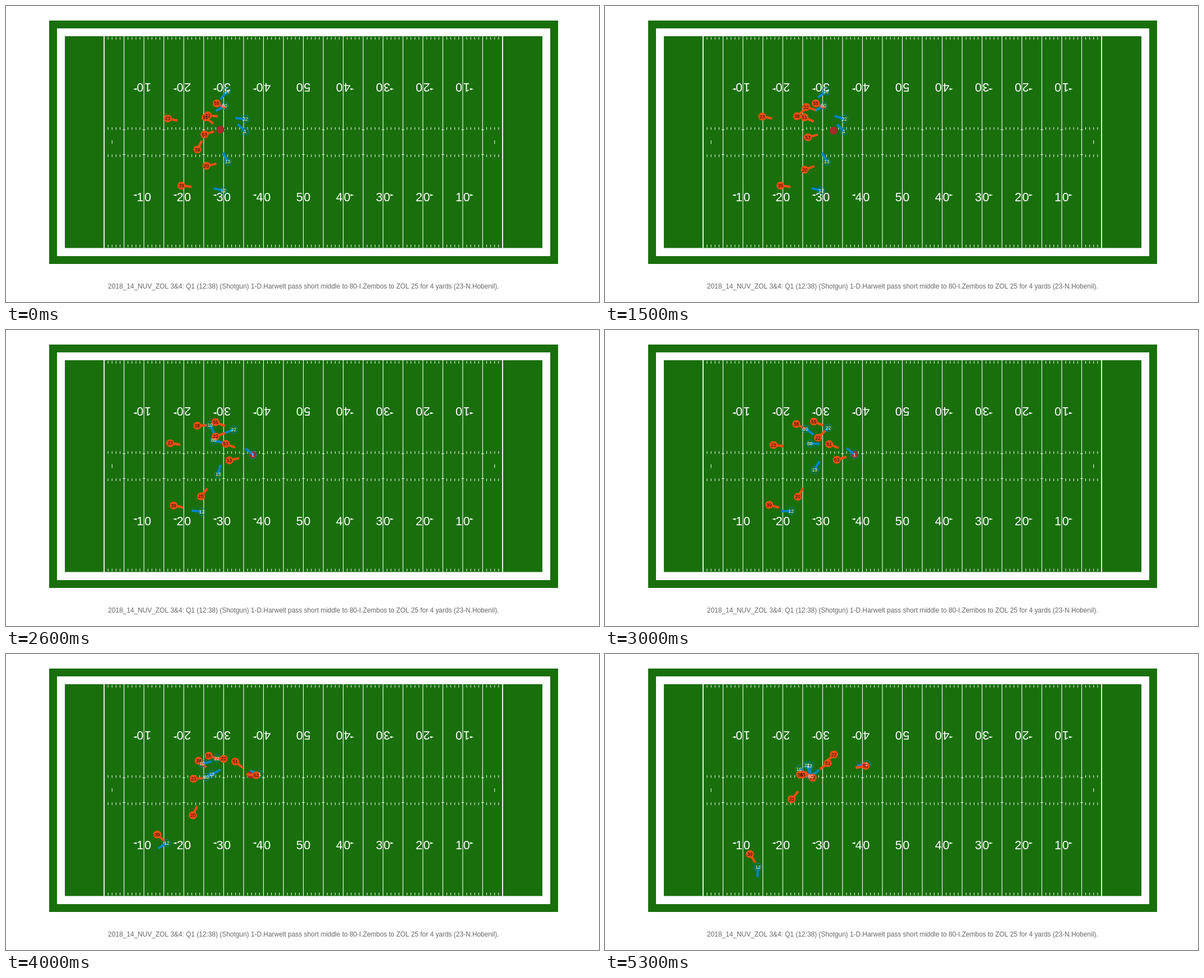
Recreate the animation shown at these times as an HTML page with a canvas. Size 1058x529 px, loop 5400 ms.

```html
<!DOCTYPE html>
<html lang="en">
<head>
<meta charset="utf-8">
<title>Passing play</title>
<style>
html, body { margin: 0; width: 100%; height: 100%; overflow: hidden; background: #fff; }
canvas { display: block; }
</style>
</head>
<body>
<canvas width="1058" height="529"></canvas>
<script>
const ctx = document.querySelector('canvas').getContext('2d');
const LOOP = 5400, STEP = 100;
const GREEN = '#196f0c', ORANGE = '#fb4f14', BLUE = '#0085ca';
const FONT = 'Arial, "Liberation Sans", sans-serif';
const CX = 530.5, CY = 243.3, YARD = 7.11;
const KEYS = [0, 1500, 3000, 4500, 5300];
const SNAP = 1100, HELD = 1800, THROWN = 3900, CAUGHT = 4500;
const SPOT = { x: 382.5, y: 221 };
const CAPTION = '2018_14_NUV_ZOL 3&4: Q1 (12:38) (Shotgun) 1-D.Harwelt pass short middle to ' +
  '80-I.Zembos to ZOL 25 for 4 yards (23-N.Hobenil).';

// A route ends at the last key; a player with a shorter one waits at its first point.
// Players face the opponent they mark, the ball, or (unmarked) where they run.
const player = (number, mark, ...route) => ({ number, mark, route });
const away = [
  player(10, 22, [394, 152.5], [357.5, 176.5], [347.5, 202.5], [346, 206]),
  player(80, 51, [390, 178], [365.5, 203], [356, 223.5], [367, 218.5]),
  player(22, 22, [427, 202], [398.5, 174.5], [367.5, 193.5], [360.5, 199]),
  player(1, 55, [426.5, 224], [445, 222.5], [457, 209], [467, 196.5]),
  player(13, 51, [395.5, 278], [374, 250], [365.5, 204], [365, 200]),
  player(12, null, [388, 330], [386, 329.5], [332, 323.5], [275, 350.5], [273, 380.5])
];
const home = [
  player(23, 'ball', [288.5, 201], [280.5, 197.5], [300.5, 205.5], [352, 228], [370.5, 221]),
  player(38, 10, [341.5, 256.5], [342.5, 197], [341, 168], [345.5, 204], [348, 215.5]),
  player(51, 'ball', [356, 199], [400, 204], [410.5, 188], [397.5, 195]),
  player(55, 22, [376, 174], [372.5, 163.5], [356.5, 195], [353, 215.5]),
  player(22, 22, [360, 195.5], [359, 180.5], [380, 192.5], [393, 184], [408.5, 179.5]),
  player(53, 'ball', [354, 229.5], [362, 234.5], [413.5, 232], [457.5, 208], [465, 200]),
  player(20, 13, [357.5, 285.5], [356.5, 292.5], [344, 298], [331, 280], [333, 259.5]),
  player(39, 12, [313, 321], [293, 312.5], [262, 331.5], [258.5, 357.5])
];

// Smooth curve through the keys that never overshoots them
function curve(times, values, t) {
  const last = times.length - 1;
  if (t <= times[0]) return values[0];
  if (t >= times[last]) return values[last];
  const i = times.findIndex(k => k > t) - 1;
  const slope = j => (values[j + 1] - values[j]) / (times[j + 1] - times[j]);
  const tangent = j => {
    if (j === 0) return slope(0);
    if (j === last) return slope(last - 1);
    const a = slope(j - 1), b = slope(j);
    return a * b > 0 ? 2 * a * b / (a + b) : 0;
  };
  const h = times[i + 1] - times[i], u = (t - times[i]) / h, v = 1 - u;
  return v * v * ((1 + 2 * u) * values[i] + u * h * tangent(i)) +
    u * u * ((1 + 2 * v) * values[i + 1] - v * h * tangent(i + 1));
}

function place({ route }, t) {
  const times = KEYS.slice(-route.length);
  const along = axis => curve(times, route.map(point => point[axis]), t);
  return { x: along(0), y: along(1) };
}

const find = (team, number) => team.find(p => p.number === number);
const angle = (from, to) => Math.atan2(to.y - from.y, to.x - from.x);

function ballPlace(t) {
  const thrower = place(find(away, 1), t), catcher = place(find(away, 80), t);
  const fly = (from, to, start, end) => {
    const u = Math.max(0, Math.min(1, (t - start) / (end - start)));
    return { x: from.x + (to.x - from.x) * u, y: from.y + (to.y - from.y) * u };
  };
  return t < THROWN ? fly(SPOT, thrower, SNAP, HELD) : fly(thrower, catcher, THROWN, CAUGHT);
}

function heading(p, rivals, ball, t) {
  const at = place(p, t), gap = Math.hypot(ball.x - at.x, ball.y - at.y);
  const chasing = t >= CAUGHT && gap > 8 && gap < 80;
  if (chasing || p.mark === 'ball') return angle(at, ball);
  if (p.mark) return angle(at, place(find(rivals, p.mark), t));
  return angle(place(p, t - 50), place(p, t + 50));
}

function rect(color, x0, y0, x1, y1) {
  ctx.fillStyle = color;
  ctx.fillRect(x0, y0, x1 - x0, y1 - y0);
}

function line(color, width, x0, y0, x1, y1) {
  ctx.strokeStyle = color;
  ctx.lineWidth = width;
  ctx.beginPath();
  ctx.moveTo(x0, y0);
  ctx.lineTo(x1, y1);
  ctx.stroke();
}

function circle({ x, y }, r) {
  ctx.beginPath();
  ctx.arc(x, y, r, 0, 2 * Math.PI);
}

function text(string, color, size, x, y) {
  ctx.font = size + 'px ' + FONT;
  ctx.fillStyle = color;
  ctx.fillText(string, x, y);
}

function yardNumbers() {
  for (let n = -4; n <= 4; n++) {
    const x = CX + n * 10 * YARD, side = Math.sign(n);
    text(5 - Math.abs(n), '#fff', 21.5, x - 6.8, 348.8);
    text(0, '#fff', 21.5, x + 6.8, 348.8);
    if (!side) continue;
    ctx.beginPath();
    ctx.moveTo(x + side * 19.5, 338);
    ctx.lineTo(x + side * 13, 336.2);
    ctx.lineTo(x + side * 13, 339.8);
    ctx.fill();
  }
}

function field() {
  rect('#fff', 0, 0, 1058, 529);
  rect(GREEN, 77, 26, 985, 461);
  rect('#fff', 91, 40, 971, 447);
  rect(GREEN, 105, 54, 957, 432.5);
  for (let yard = -50; yard <= 50; yard++) {
    const x = CX + yard * YARD, goal = Math.abs(yard) === 50;
    if (yard % 5 === 0) {
      line('#fff', goal ? 1.8 : 1.1, x, 54, x, 432.5);
      if (!goal) for (const y of [221, 265.5]) line('#fff', 1, x - 2.4, y, x + 2.4, y);
    } else {
      for (const y of [55.4, 216.6, 265.4, 426.6]) line('#fff', 1, x, y, x, y + 4.6);
    }
    if (Math.abs(yard) === 48) line('#fff', 1, x, 240, x, 246.6);
  }
  yardNumbers();
  ctx.save();
  ctx.translate(2 * CX, 2 * CY);
  ctx.rotate(Math.PI);
  yardNumbers();
  ctx.restore();
  text(CAPTION, '#666', 11.92, 530.8, 505);
}

function arms(team, rivals, color, ball, t) {
  for (const p of team) {
    const { x, y } = place(p, t), a = heading(p, rivals, ball, t);
    line(color, 4.2, x, y, x + 18 * Math.cos(a), y + 18 * Math.sin(a));
  }
}

function labels(team, color, t) {
  for (const p of team) {
    const { x, y } = place(p, t);
    text(p.number, color, 8.4, x, y + 3);
  }
}

function draw(now) {
  const t = Math.floor(now % LOOP / STEP) * STEP;
  const ball = ballPlace(t);
  ctx.textAlign = 'center';
  field();

  ctx.fillStyle = '#a52a2a';
  circle(ball, 7);
  ctx.fill();

  arms(away, home, BLUE, ball, t);
  arms(home, away, ORANGE, ball, t);
  for (const p of away) {
    ctx.strokeStyle = BLUE;
    ctx.lineWidth = 1;
    circle(place(p, t), 6.5);
    ctx.stroke();
  }
  for (const p of home) {
    ctx.fillStyle = ORANGE;
    circle(place(p, t), 7);
    ctx.fill();
  }
  labels(home, '#000', t);
  labels(away, '#fff', t);
}

const start = performance.now();
function tick() {
  draw(performance.now() - start);
  requestAnimationFrame(tick);
}
tick();
</script>
</body>
</html>
```
